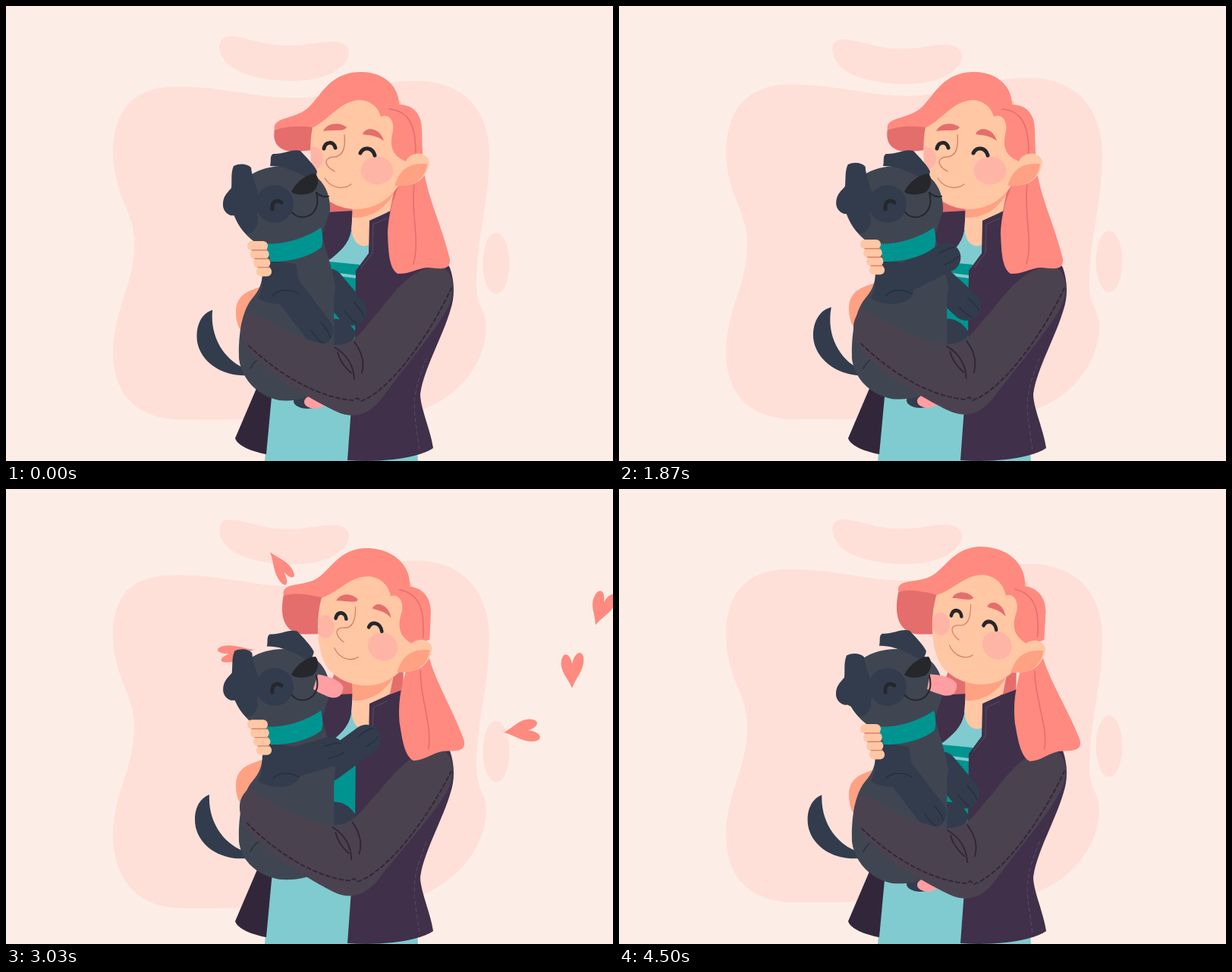
An HTML page for the animation above (4530 ms loop, 800 by 600 pixels).

```html
<!DOCTYPE html>
<html lang="en">
<head>
<meta charset="utf-8">
<title>Puppy hug</title>
<style>
  html, body { margin: 0; width: 100%; height: 100%; overflow: hidden; background: #fceee6; }
  svg { display: block; width: 100vw; height: 100vh; }
  .blob { fill: #fee0d9; }
  .hair { fill: #ff8a80; }
  .deep { fill: #e46e6c; }
  .skin { fill: #ffc7a4; }
  .shade { fill: #ffa183; }
  .cheek { fill: #ffb5a6; }
  .jacket { fill: #40304a; }
  .arm { fill: #4b4250; }
  .shirt { fill: #80cbcf; }
  .teal { fill: #009490; }
  .fur { fill: #3f4652; }
  .dark { fill: #323c4d; }
  .ink { fill: #26272b; }
  .pink { fill: #ff9ea3; }
  .line { fill: none; stroke-linecap: round; stroke-linejoin: round; }
  .eye { stroke: #26272b; stroke-width: 5; }
  .mouth { stroke: #26272b; stroke-width: 2; }
  .thin { stroke: #d9806c; stroke-width: 1.4; }
  .strand { stroke: #e46e6c; stroke-width: 1.5; }
  .seam { stroke: #32273a; stroke-width: 2; }
  .dash { stroke-dasharray: 5 4; }
  .stitch { stroke: #5b4a64; stroke-width: 1; }
  .furline { stroke: #25303f; stroke-width: 1.4; }
  .leg { stroke: #323c4d; stroke-width: 39; }
</style>
</head>
<body>
<svg viewBox="0 0 800 600">
  <defs>
    <clipPath id="faceClip"><use href="#face"/></clipPath>
    <path id="heart" d="M0 24C-6 10 -17 2 -15 -12C-13 -25 -3 -23 0 -8C3 -24 14 -28 16 -16C17 0 5 10 0 24Z"/>
  </defs>
  <rect width="800" height="600" fill="#fceee6"/>
  <path id="cloud" class="blob"/>
  <path id="puff" class="blob" d="M283 45C290 32 318 44 345 49C385 56 405 46 430 46C452 46 456 60 449 71C438 88 412 99 372 98C335 97 305 88 292 75C281 64 279 52 283 45Z"/>
  <ellipse id="drop" class="blob" cx="646" cy="337.5" rx="17.5" ry="40.5"/>
  <g id="hearts" class="hair"></g>

  <!-- torso -->
  <path class="deep" d="M436 235L460 255V272L422 273L421 292L413 295ZM500 240L524 232L523 276L500 272Z"/>
  <path class="shirt" d="M349 505L341 600H543L540 560L480 500V300L455 295L420 340V440Z"/>
  <path class="teal" d="M425 337L466 341V440H425Z"/>
  <path class="shirt" d="M430 351L461 355V359L430 355Z"/>
  <path class="jacket" d="M421 272L457 270L455 296C452 314 440 324 426 335L416 318V295Z"/>
  <path fill="#32273a" d="M334 495L302 570C305 580 325 588 343 591L351 505Z"/>
  <path class="skin" d="M457 255L456 300C460 317 472 319 480 314L479 283L506 270L512 240Z"/>
  <path class="shade" d="M456 255L514 238C508 262 482 281 457 279Z"/>
  <path class="jacket" d="M479 283L503 272L530 262L585 345C592 365 591 385 586 400C576 435 550 480 546 512C546 530 560 560 563 583C540 598 490 602 450 599L455 530L460 440L461 349L478 326Z"/>
  <path class="line stitch" d="M502 280L484 288L483 326L468 345"/>
  <path class="line stitch dash" d="M554 465C540 500 535 520 540 550L545 586"/>

  <!-- head -->
  <g id="head">
    <path id="flip" class="deep" d="M354 162C350 183 362 193 384 192L404 190L410 154C385 154 368 154 354 162Z"/>
    <path id="face" class="skin" d="M406 152C396 186 402 240 424 256C446 272 480 273 504 252C516 242 524 228 532 206L520 125L466 108Z"/>
    <g clip-path="url(#faceClip)">
      <g id="features">
        <ellipse class="cheek" cx="405" cy="201" rx="13" ry="15"/>
        <ellipse class="cheek" cx="489" cy="217" rx="21.5" ry="18.5"/>
        <path class="deep" d="M418 165C424 153 441 153 449 160C446 166 431 163 418 165ZM470 169C474 158 493 160 498 178C488 170 480 171 470 169Z"/>
        <path class="line eye" d="M419 188C421 178 432 178 434 187M467 194C471 185 483 186 486 197"/>
        <path class="line thin" d="M446 170C448 190 442 198 433 199C424 199 420 204 423 209C425 214 429 216 433 218M420 227C428 240 444 243 455 235"/>
      </g>
    </g>
    <path class="hair" d="M354 164C350 146 378 150 396 136C414 122 424 88 466 87C500 86 518 108 518 130C538 130 548 144 548 163L549 196L530 206C508 198 505 185 510 165C512 152 505 141 494 146C490 131 478 124 465 124C440 126 428 148 405 160C385 158 368 158 354 164Z"/>
    <path class="line strand" d="M505 136C530 138 540 155 540 195"/>
  </g>

  <!-- dog -->
  <path id="forearm" class="shade" d="M340 369C320 375 303 380 303 404C303 418 308 428 312 430L338 400Z"/>
  <path id="tail" class="dark" d="M268 403C254 408 246 425 250 446C256 472 284 490 318 487L315 478C290 470 266 442 268 403Z"/>
  <g id="legR"><path class="line leg"/><path class="line furline"/></g>
  <path class="dark" d="M430 413C442 410 456 420 462 432L450 452L422 445Z"/>
  <g id="foot">
    <ellipse class="dark" cx="-5" cy="-1" rx="18" ry="10"/>
    <ellipse class="pink" cx="5" rx="14" ry="9"/>
  </g>
  <path id="body" class="fur"/>
  <path class="line furline" d="M322 478C326 470 333 464 340 460"/>
  <path class="dark" d="M341 334C334 360 342 368 332 385C350 397 382 396 388 378L382 340Z"/>
  <g id="legL"><path class="line leg"/><path class="line furline"/></g>
  <path class="line furline" d="M352 382C358 373 376 373 386 380"/>

  <path class="fur" d="M322 223C345 208 382 207 403 221C420 231 428 250 427 270L418 298L350 322C325 315 308 295 300 275C295 255 305 233 322 223Z"/>
  <path class="dark" d="M300 245C315 240 330 250 332 285C330 296 322 301 316 300C304 290 296 268 300 245Z"/>
  <circle class="dark" cx="354" cy="261" r="25"/>
  <path id="earTop" class="dark" d="M348 211C350 204 347 198 352 195C366 196 376 188 388 191C396 200 405 208 410 218C409 225 406 228 402 229C386 220 366 210 348 211Z"/>
  <path id="earSide" class="dark" d="M300 211C308 207 318 208 323 213C324 228 333 240 335 262C330 285 312 282 301 276C294 278 285 270 286 261C286 251 292 246 297 240C298 230 296 220 300 211Z"/>
  <path id="tongue" class="pink" d="M0 -10C15 -12 30 -12 37 -4C40 8 34 14 22 14C12 13 4 12 0 10Z"/>
  <path class="ink" d="M376 245C382 232 397 221 408 221C414 229 411 239 405 245C395 250 382 250 376 245Z"/>
  <path class="line mouth" d="M377 272C386 283 406 280 410 262C411 256 410 250 409 246"/>
  <path id="lip" class="line mouth" d="M409 246C414 251 420 252 425 251"/>
  <path class="line eye" d="M351 268C350 257 357 255 363 259"/>
  <path class="teal" d="M341 313C365 316 398 305 415 292C418 302 418 311 416 318C402 330 374 338 349 337Z"/>

  <!-- arm and hair in front -->
  <g id="arm">
    <path class="arm" d="M322 402C350 418 390 444 432 447C462 448 470 425 492 402C520 365 540 345 568 344C590 344 592 372 585 392C572 422 530 470 496 516C480 538 460 546 436 535C400 518 350 488 326 462C306 440 304 416 322 402Z"/>
    <path class="line seam dash" d="M320 448C360 486 410 516 457 520L463 517L468 521C510 505 560 430 587 372"/>
    <path class="line seam" d="M433 450C450 460 458 474 459 492M437 457C440 468 446 476 455 484M459 443C468 455 473 470 469 484"/>
  </g>
  <g id="hand"></g>
  <g id="long">
    <path class="hair" d="M549 190C548 240 572 280 585 334C586 350 572 346 556 345C540 346 532 354 516 353C504 346 504 320 503 300C504 270 512 250 524 222Z"/>
    <path class="line strand" d="M538 236C533 270 546 310 537 340"/>
  </g>
  <g id="ear">
    <path class="skin" d="M529 201C540 190 556 194 558 206C554 232 536 238 512 237Z"/>
    <path class="shade" d="M512 237C520 212 534 207 555 208C553 226 540 239 512 237Z"/>
  </g>
</svg>
<script>
const LOOP = 4530;
const $ = id => document.getElementById(id);
const set = (el, attrs) => { for (const k in attrs) el.setAttribute(k, attrs[k]); };
const move = (id, transform) => set($(id), { transform });
const add = (parent, tag, attrs) => {
  const el = document.createElementNS('http://www.w3.org/2000/svg', tag);
  set(el, attrs);
  return parent.appendChild(el);
};

const clamp = x => Math.max(0, Math.min(1, x));
const ease = x => (x = clamp(x), x * x * (3 - 2 * x));
// Rises from a to b, holds, falls from c to d.
const pulse = (t, a, b, c, d) => ease((t - a) / (b - a)) - ease((t - c) / (d - c));
// Wave with n cycles per loop and its crest at the given time.
const wave = (t, n, crest) => Math.cos(2 * Math.PI * n * (t - crest) / LOOP);

// Bursts of hearts: when they are in full view, then x, y, angle of each.
const bursts = [
  [730, [681, 225, 5], [688, 398, 80]],
  [1370, [582, 198, 75], [683, 237, 5], [687, 273, -52]],
  [2330, [570, 247, 170], [678, 320, 85], [643, 382, 115], [319, 67, 85], [263, 168, -30], [221, 197, 15]],
  [3030, [785, 157, 20], [746, 239, 0], [680, 319, 85], [362, 103, 145], [303, 216, -100]],
  [3830, [793, 128, 5], [126, 5, -40], [187, 47, 5], [224, 178, -35]]
];
const hearts = bursts.flatMap(([time, ...spots]) => spots.map(([x, y, angle]) =>
  ({ time, x, y, angle, side: x < 450 ? -1 : 1, el: add($('hearts'), 'use', { href: '#heart' }) })));

function drawHeart({ el, time, x, y, angle, side }, t) {
  const dt = t - time, size = pulse(dt, -420, -200, 200, 420);
  const wide = size * (side < 0 ? .72 : .95);
  set(el, { transform: `translate(${x + side * .16 * dt} ${y - .15 * dt}) rotate(${angle + side * .02 * dt}) scale(${wide} ${size})` });
}

function buildHand() {
  let gaps = '';
  for (let i = 0; i < 4; i++) {
    const x = 318 + 4 * i, y = 310 + 11.3 * i, width = 27 - 2.3 * i;
    add($('hand'), 'rect', { class: 'skin', x, y, width, height: 12.5, rx: 6 });
    if (i < 3) gaps += `M${x + 6} ${y + 12}h${width - 7}`;
  }
  add($('hand'), 'path', { class: 'line thin', d: gaps });
}

function drawLeg(id, sx, sy, x, y) {
  const [limb, toes] = $(id).children, len = Math.hypot(x - sx, y - sy);
  const ux = (x - sx) / len, uy = (y - sy) / len;
  const p = (f, s) => `${x + ux * f - uy * s} ${y + uy * f + ux * s}`;
  set(limb, { d: `M${sx} ${sy}L${x} ${y}` });
  set(toes, { d: [-7, 6].map(s => `M${p(-6, s * 1.3)}Q${p(10, s * 1.4)} ${p(16, s)}`).join('') });
}

function drawBackdrop(t) {
  const a = 108.5 + 5 * wave(t, 2, 740), b = 94.7 - 4.6 * wave(t, 2, 1300), c = 549 + 4.3 * wave(t, 2, 900);
  set($('cloud'), { d: `M225 ${a}C290 ${a} 330 ${a + 16} 385 ${a + 15}C440 ${a + 13} 480 ${b} 540 ${b}` +
    `C610 ${b} 637 145 637 195C637 260 619 310 620 372C622 400 633 400 633 425C630 490 570 540 500 ${c - 4}` +
    `C420 ${c - 4} 330 ${c} 235 ${c}C160 ${c} 141 500 141 455C143 395 169 370 169 312` +
    `C169 270 141 250 141 190C143 130 175 ${a} 225 ${a}Z` });
  move('puff', `translate(0 ${3 - 4 * wave(t, 2, 350)})`);
  move('drop', `translate(0 ${4 + 4.7 * wave(t, 2, 730)})`);
}

// k: 0 leaning in, 1 tilted back
function drawGirl(k, lift) {
  move('head', `matrix(1 ${.19 * k} ${-.1 * k} 1 ${33 * k} ${-100.7 * k})`);
  move('features', `translate(${5 * k + 440} ${-5 * k}) scale(${1 - .12 * k} 1) translate(-440 0)`);
  move('flip', `translate(0 158) scale(1 ${1 + .8 * k}) translate(0 -158)`);
  move('long', `translate(${6 * k} ${5 * k}) rotate(${-9 * k} 540 200)`);
  move('ear', `translate(${5 * k} ${6 * k})`);
  move('arm', `rotate(${3 * lift} 570 365)`);
  move('forearm', `translate(0 ${-22 * lift})`);
  move('hand', `translate(0 ${-10 * lift})`);
}

function drawDog(t, k, lift) {
  const lick = pulse(t, 150, 500, 900, 1700) + ease((t - 2450) / 400);
  const tuck = pulse(t, 2400, 2900, 3900, 4450);
  const bottom = 520 - 9 * lift;
  move('tail', `rotate(${-7 + 18 * wave(t, 5, 144)} 315 485)`);
  move('foot', `translate(402 ${522 - 5 * lift - 28 * tuck})`);
  set($('body'), { d: `M345 325C335 350 343 365 325 385C312 400 306 430 307 465C310 490 330 ${bottom - 6} 360 ${bottom}` +
    `C385 ${bottom + 2} 402 ${bottom - 4} 412 505L432 450C434 420 430 400 434 370C430 345 422 325 418 308Z` });

  const left = Math.sin(Math.PI * t / LOOP) ** 1.5;
  const right = pulse(t, 50, 600, 650, 2100) + pulse(t, 2350, 3400, 3700, 4450);
  drawLeg('legL', 364, 365, 412 + 20 * left, 428 - 102 * left);
  drawLeg('legR', 426, 366, 456 + 26 * right, 402 - 100 * right);

  move('earTop', `translate(${-6 * k} ${-5 * k})`);
  move('earSide', `translate(0 ${10 * k - 7 * lift}) rotate(${8 * lift * (1 - k)} 320 270)`);
  move('tongue', `translate(408 254) rotate(${4 + 46 * (1 - k)}) scale(${lick})`);
  set($('lip'), { opacity: 1 - lick });
}

function render(t) {
  const tilt = pulse(t, 200, 600, 820, 1200) + pulse(t, 2400, 2800, 2880, 3300) + .85 * ease((t - 3900) / 500);
  const lift = .75 * Math.sin(2 * Math.PI * t / LOOP) ** 2;
  drawBackdrop(t);
  hearts.forEach(h => drawHeart(h, t));
  drawGirl(tilt, lift);
  drawDog(t, tilt, lift);
}

function tick() {
  render(performance.now() % LOOP);
  requestAnimationFrame(tick);
}
buildHand();
tick();
</script>
</body>
</html>
```
